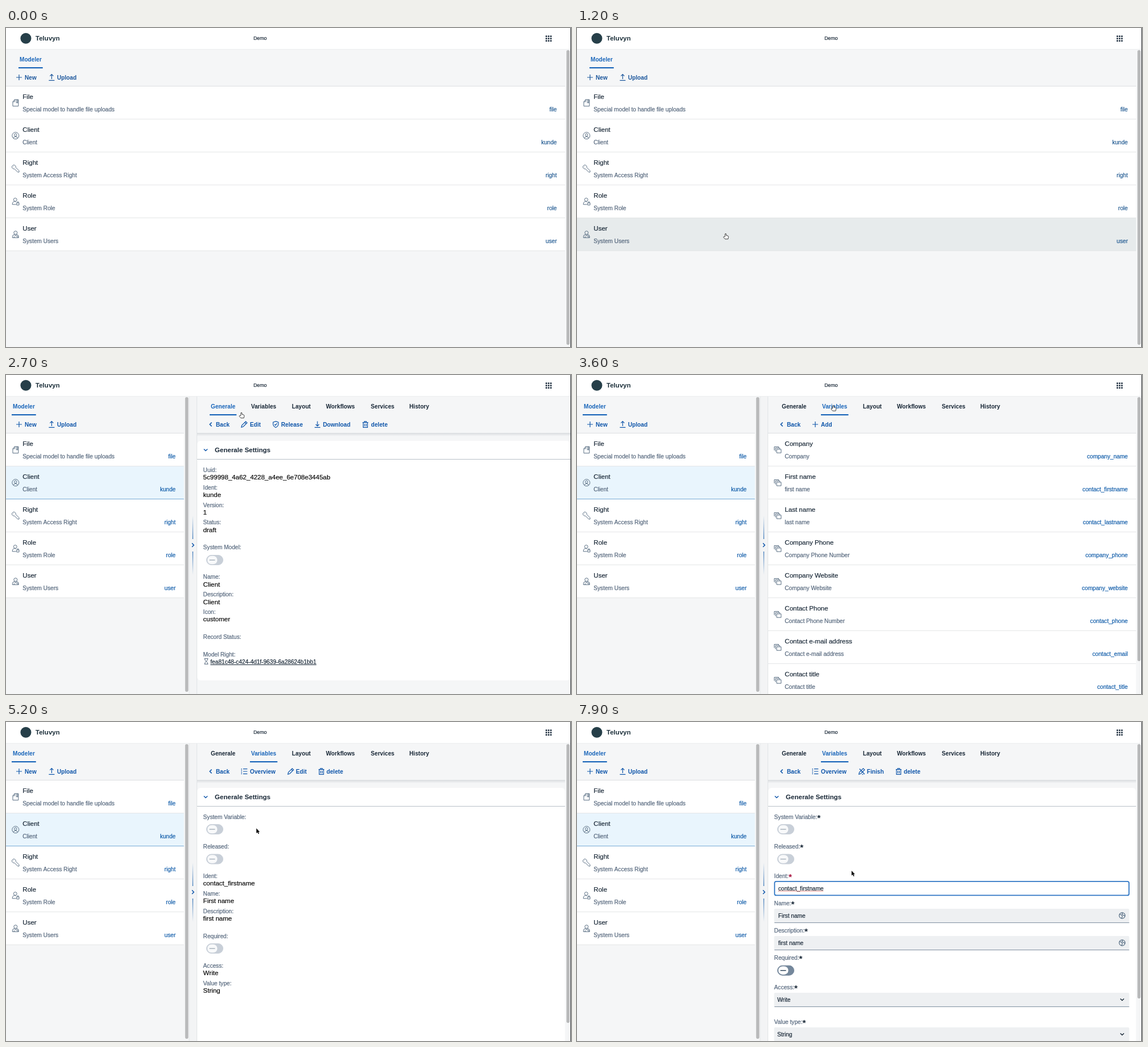
Animation, 996 px wide and 562 px high, one loop 8 s. Source, as an HTML page with a canvas:

```html
<!DOCTYPE html>
<html lang="en">
<head>
<meta charset="utf-8">
<title>Model editor</title>
<style>
html, body { margin: 0; width: 100%; height: 100%; overflow: hidden; background: #f5f6f7; }
canvas { display: block; width: 996px; height: 562px; }
</style>
</head>
<body>
<canvas id="stage"></canvas>
<script>
const W = 996, H = 562, LOOP = 8000, STEP = 100;
const SMALL = 10.14, LARGE = 11.55;
const INK = '#182736', GREY = '#52647a', PAGE = '#f5f6f7', HOVER = '#e7ebec', BLACK = '#080808';

const canvas = document.getElementById('stage');
const dpr = window.devicePixelRatio || 1;
canvas.width = W * dpr;
canvas.height = H * dpr;
const g = canvas.getContext('2d');
let accent, linkColor;

// Times of the hard changes between views
const SPLIT = 2100, LIST = 3200, READ = 4700, EDIT = 6400, FOCUS = 7400;

// Pointer path: time, x, y
const PATH = [
  [200, 560, 240], [500, 430, 380], [700, 330, 466], [1000, 310, 427],
  [1200, 262, 362], [1500, 140, 212], [1600, 128, 199], [2000, 132, 197],
  [2200, 200, 180], [2600, 405, 75], [2700, 415, 66], [3000, 450, 56],
  [3700, 452, 53], [3900, 440, 140], [4000, 433, 181], [4600, 440, 186],
  [5500, 442, 188], [6000, 505, 90], [6300, 508, 83], [6400, 508, 84],
  [6600, 501, 120], [7100, 488, 296], [7600, 487, 296], [7900, 484, 262]
];

const MODELS = [
  ['file', 'File', 'Special model to handle file uploads', 'file'],
  ['client', 'Client', 'Client', 'kunde'],
  ['key', 'Right', 'System Access Right', 'right'],
  ['role', 'Role', 'System Role', 'role'],
  ['user', 'User', 'System Users', 'user']
];
const VARIABLES = [
  ['Company', 'Company', 'company_name'],
  ['First name', 'first name', 'contact_firstname'],
  ['Last name', 'last name', 'contact_lastname'],
  ['Company Phone', 'Company Phone Number', 'company_phone'],
  ['Company Website', 'Company Website', 'company_website'],
  ['Contact Phone', 'Contact Phone Number', 'contact_phone'],
  ['Contact e-mail address', 'Contact e-mail address', 'contact_email'],
  ['Contact title', 'Contact title', 'contact_title']
].map(v => ['stack', ...v]);
const TABS = [['Generale', 361], ['Variables', 432], ['Layout', 504],
  ['Workflows', 564], ['Services', 643], ['History', 711]];

// Icons are drawn around 0,0
const ICONS = {
  file: 'M-4.8-1.8L-1.6-5.6H5V6H-4.8ZM-1.6-5.6V-1.8H-4.8M1.4-5.6V.4L2.6-.6 3.7.4V-5.6',
  client: 'M6 0A6 6 0 1 1-6 0A6 6 0 1 1 6 0M2.2-1.3A2.2 2.2 0 1 1-2.2-1.3A2.2 2.2 0 1 1 2.2-1.3M-3.6 4.6Q-3 1.6 0 1.6T3.6 4.6',
  key: 'M.4-2A3.4 3.4 0 1 0-2 .4L3.8 6.2H6.2V3.8ZM-3.7-3.7L-3-3',
  role: 'M2.4-3.2A2.9 2.9 0 1 1-3.4-3.2A2.9 2.9 0 1 1 2.4-3.2M1 5.2H-5.6Q-5.6.2-1.6-.1L1 .4M2 2.4H6.2V6.2H2ZM2.8 2.4V1Q4.1-.6 5.4 1V2.4',
  user: 'M3-3A3 3 0 1 1-3-3A3 3 0 1 1 3-3M-5.4 5.8V3.5Q-5 .4-2 .2L0 2.6 2 .2Q5 .4 5.4 3.5V5.8ZM.8 3.2H4.2V5.8M-2.5 3V5.8',
  stack: 'M-1.8-.8H6V5.5H-1.8ZM-3.9 3.2V-3H3.8V-1.4M-6 1V-5.2H1.7V-3.6',
  plus: 'M-5 0H5M0-5V5',
  upload: 'M-5 5.4H5M0 3V-5.4M-3-2.4L0-5.4 3-2.4',
  download: 'M-5 5.4H5M0-5.4V3M-3 0L0 3 3 0',
  back: 'M1.6-3.4L-1.8 0 1.6 3.4',
  edit: 'M-5 5L-4.2 1.6 2.6-5.2 5-2.8-1.8 4ZM.9-3.5L3.3-1.1',
  finish: 'M-5 5L-4.2 1.6 2.6-5.2 5-2.8-1.8 4ZM-4-4.5L5 5M.5 5.3H2.5',
  shield: 'M0-5.4L4.6-3.8V0Q4 3.7 0 5.5-4 3.7-4.6 0V-3.8ZM-2.1-.2L-.5 1.5 2.3-1.8',
  trash: 'M-5-3.4H5M-1.8-3.6V-5.2H1.8V-3.6M-3.8-3.2V5.3H3.8V-3.2M-1.4-1V3.2M1.4-1V3.2',
  overview: 'M-5.4-4.4H-4M-5.4 0H-4M-5.4 4.4H-4M-2-4.4H5.4M-2 0H5.4M-2 4.4H5.4M-5.4-2.2H-4M-5.4 2.2H-4',
  globe: 'M5.2 0A5.2 5.2 0 1 1-5.2 0A5.2 5.2 0 1 1 5.2 0M-4.4-2.2L-1-1 .4 1.4-1 4.8M.6-4.8L0-2.4 2.2-.4 4.6.6',
  hourglass: 'M-3.4-4.8H3.4M-3.4 4.8H3.4M-2.6-4.6Q-2.6-1.4 0 0T2.6 4.6M2.6-4.6Q2.6-1.4 0 0T-2.6 4.6',
  down: 'M-3.2-1.6L0 1.6 3.2-1.6',
  right: 'M-1.6-3.4L1.6 0-1.6 3.4'
};
for (const k in ICONS) ICONS[k] = new Path2D(ICONS[k]);

const ARROW = new Path2D('M0 0V8.6L2 6.8 3.5 10 4.9 9.3 3.5 6.3H6Z');
const HAND = new Path2D('M-1 5.4V.8Q0-.6 1 .8V3.4L4 4.1Q5.2 4.6 5 6.4L4.2 9.8H-1L-3.8 6.6Q-3.6 5-2.2 5.6Z');

function rect(x, y, w, h, color) {
  g.fillStyle = color;
  g.fillRect(x, y, w, h);
}
function round(x, y, w, h, r, fill, stroke, width = 1) {
  g.beginPath();
  g.roundRect(x, y, w, h, r);
  if (fill) { g.fillStyle = fill; g.fill(); }
  if (stroke) { g.strokeStyle = stroke; g.lineWidth = width; g.stroke(); }
}
function text(s, x, y, color, size = SMALL, bold = false, align = 'left') {
  const base = y + size * 0.355;   // y is the middle of the capitals
  g.font = `${bold ? 'bold ' : ''}${size}px "Liberation Sans", Arial, sans-serif`;
  g.textAlign = align;
  g.fillStyle = color;
  g.fillText(s, x, base);
  if (!bold) {
    // a hairline gives regular text a little more weight
    g.strokeStyle = color;
    g.lineWidth = 0.2;
    g.strokeText(s, x, base);
  }
  return g.measureText(s).width;
}
function icon(name, x, y, color, width = 1) {
  g.save();
  g.translate(x, y);
  g.strokeStyle = color;
  g.lineWidth = width;
  g.stroke(ICONS[name]);
  g.restore();
}
function button(name, label, x, labelX) {
  icon(name, x, 87, accent, name === 'back' ? 1.5 : 1.2);
  text(label, labelX, 87, accent, SMALL, true);
}
function tab(label, x, active) {
  const w = text(label, x, 55, active ? '#1a66ba' : INK, SMALL, true);
  if (active) rect(x - 2, 69, w + 4, 2.2, '#1a66ba');
}
function thumb(x, bottom) {
  round(x, 39, 5.6, bottom - 39, 2.8, '#b9babb');
}

function rows(items, x0, x1, hover, selected = -1) {
  items.forEach(([name, title, note, link], i) => {
    const y = 103 + 58 * i, active = i === selected;
    rect(x0, y, x1 - x0, 58, active ? '#e9f5fd' : i === hover ? HOVER : '#fff');
    rect(x0, y + 57, x1 - x0, active ? 1.5 : 1, active ? '#78aad6' : '#e4e6e7');
    icon(name, x0 + 16.8, y + 28.7, '#586d82');
    text(title, x0 + 29.3, y + 18, INK, LARGE);
    text(note, x0 + 29.3, y + 40, GREY);
    text(link, x1 - 14.5, y + 40, linkColor, SMALL, false, 'right');
  });
}
const rowAt = (p, x0, x1) =>
  p && p.x >= x0 && p.x < x1 && p.y >= 103 ? Math.floor((p.y - 103) / 58) : -1;

function topBar() {
  rect(0, 0, W, 37, '#fff');
  g.beginPath();
  g.arc(35, 18.3, 9.5, 0, 7);
  g.fillStyle = '#263f49';
  g.fill();
  text('Teluvyn', 52, 18, '#1c2f3a', LARGE, true);
  text('Demo', 436.2, 18, INK, 8.8);
  for (let i = 0; i < 9; i++)
    round(951.2 + i % 3 * 4, 13.2 + Math.floor(i / 3) * 4, 2.7, 2.7, 0.7, '#1d2d3e');
  rect(0, 37, W, 1, '#eceeef');
}

function modeler(split, p) {
  const edge = split ? 313.5 : 985.5;
  tab('Modeler', split ? 12 : 24, true);
  button('plus', 'New', 23, 33);
  button('upload', 'Upload', 80.5, 90);
  rect(0, 102, edge, 1, '#dcdfe1');
  rows(MODELS, 0, edge, rowAt(p, 0, edge), split ? 1 : -1);
  thumb(split ? 315.8 : 988, 558);
}

function splitter() {
  rect(322.5, 38, 14, 524, '#f3f4f5');
  rect(322.5, 38, 1, 524, '#e6e8ea');
  rect(336, 38, 1, 524, '#e1e4e6');
  for (const [top, bottom, from] of [[248, 289, 0], [311, 352, 1]]) {
    const fade = g.createLinearGradient(0, top, 0, bottom);
    fade.addColorStop(from, 'rgba(45,110,180,0)');
    fade.addColorStop(1 - from, 'rgba(45,110,180,1)');
    rect(328.7, top, 1.2, bottom - top, fade);
  }
  icon('right', 329.5, 299.7, accent, 1.5);
}

function toggle(y, enabled) {
  const color = enabled ? '#74879b' : '#c8cfd8';
  round(353.5, y - 8.5, 29, 17, 8.5, color, color);
  round(355, y - 7.3, 17.5, 14.6, 7.3, enabled ? '#fff' : '#f8f9fa');
  rect(358.5, y - 0.7, 10, 1.5, enabled ? '#33485d' : '#a8b2bd');
}
function field(label, y, value) {
  text(label + ':', 347.6, y, GREY);
  if (value) text(value, 347.6, y + 12.8, BLACK, LARGE);
}
function required(label, y, color = INK) {
  const w = text(label + ':', 347.6, y, GREY);
  text('*', 347.6 + w, y + 1.2, color, 15, true);
}
function input(y, value, kind) {
  const x = kind === 'select' ? 353 : 354.8;
  round(347.5, y - 12, 626, 24.5, 2, '#eef0f2');
  rect(348, y + 12, 625.5, 1.1, '#8796a5');
  text(value, x, y, INK);
  if (kind === 'select') icon('down', 961, y, INK, 1.4);
  if (kind === 'globe') icon('globe', 961, y, '#526a80', 1.2);
}
function panel(right, bottom) {
  const fade = g.createLinearGradient(0, 102, 0, 108);
  fade.addColorStop(0, '#d9dcdf');
  fade.addColorStop(1, PAGE);
  rect(337, 102, right - 337, 6, fade);
  round(337, 116, right - 337, bottom - 116, 6, '#fff');
  rect(337, 148, right - 337, 1, '#b9c0c7');
  icon('down', 352, 132, accent, 1.4);
  text('Generale Settings', 368, 132, INK, LARGE, true);
}

function general() {
  button('edit', 'Edit', 420, 430);
  button('shield', 'Release', 475.5, 485);
  button('download', 'Download', 549, 558.7);
  button('trash', 'delete', 633.5, 643.5);
  panel(995, 538);
  field('Uuid', 167, '5c99998_4a62_4228_a4ee_6e708e3445ab');
  field('Ident', 198, 'kunde');
  field('Version', 229, '1');
  field('Status', 259.7, 'draft');
  field('System Model', 303.7);
  toggle(326, false);
  field('Name', 355.8, 'Client');
  field('Description', 386.7, 'Client');
  field('Icon', 417.5, 'customer');
  field('Record Status', 461.5);
  field('Model Right', 492);
  icon('hourglass', 353, 504.5, GREY);
  const w = text('fea81c48-c424-4d1f-9639-6a28624b1bb1', 360.3, 505, INK);
  rect(360.3, 510, w, 1, INK);
}

function variableList(p) {
  button('plus', 'Add', 420, 430);
  rect(337, 102, 648.5, 1, '#dcdfe1');
  rows(VARIABLES, 337, 985.5, rowAt(p, 337, 985));
  thumb(988, 504);
}

function ripple() {
  g.beginPath();
  g.arc(509, 84, 10, 0, 7);
  g.fillStyle = 'rgba(130,135,140,.1)';
  g.fill();
  g.strokeStyle = 'rgba(130,135,140,.3)';
  g.lineWidth = 2;
  g.stroke();
}

function readVariable(t, p) {
  button('overview', 'Overview', 420, 430);
  if (p.x > 490 && p.y < 98) round(490, 76, 46, 22, 4, HOVER);
  if (t >= 6300) ripple();
  button('edit', 'Edit', 502, 511);
  button('trash', 'delete', 556, 565);
  panel(985.5, 570);
  field('System Variable', 167);
  toggle(189, false);
  field('Released', 219.5);
  toggle(241.5, false);
  field('Ident', 271.5, 'contact_firstname');
  field('Name', 302.5, 'First name');
  field('Description', 333.3, 'first name');
  field('Required', 377);
  toggle(399, false);
  field('Access', 429, 'Write');
  field('Value type', 460, 'String');
  thumb(988, 530);
}

function editVariable(focused) {
  button('overview', 'Overview', 420, 430);
  if (!focused) {
    round(490.5, 76.5, 55.5, 21.5, 4, '#fff', accent, 1.8);
    ripple();
  }
  button('finish', 'Finish', 502, 511);
  button('trash', 'delete', 567, 576);
  panel(985.5, 570);
  required('System Variable', 167);
  toggle(189, false);
  required('Released', 219.5);
  toggle(241.5, false);
  required('Ident', 271.5, focused ? '#a8123e' : INK);
  if (focused) {
    round(348.3, 280.8, 624.8, 24.6, 3, '#fff', '#2f76c4', 1.8);
    const w = text('contact_firstname', 354.8, 293, INK);
    for (let x = 0; x < w; x += 2) rect(354.8 + x, 297.4, 1.2, 1.2, '#e0655f');
  } else {
    input(293, 'contact_firstname');
  }
  required('Name', 319.5);
  input(341, 'First name', 'globe');
  required('Description', 367.5);
  input(389, 'first name', 'globe');
  required('Required', 415.5);
  toggle(437.7, true);
  required('Access', 467.5);
  input(489, 'Write', 'select');
  required('Value type', 528.5);
  input(550, 'String', 'select');
  thumb(988, 487);
}

function pointerAt(t) {
  if (t < PATH[0][0]) return null;
  const i = PATH.findIndex(k => k[0] > t);
  if (i < 0) return { x: PATH.at(-1)[1], y: PATH.at(-1)[2] };
  const [t0, x0, y0] = PATH[i - 1], [t1, x1, y1] = PATH[i];
  const k = (t - t0) / (t1 - t0);
  return { x: x0 + (x1 - x0) * k, y: y0 + (y1 - y0) * k };
}
function pointerKind(t, { x, y }) {
  if (t < SPLIT) return y > 103 && y < 392 ? 'hand' : 'arrow';
  if (x < 313 || y < 100) return 'hand';
  if (t >= LIST && t < READ) return 'hand';
  return t >= EDIT && y > 280 && y < 306 ? 'beam' : 'arrow';
}
function pointer(t, p) {
  const kind = pointerKind(t, p);
  g.save();
  g.translate(p.x, p.y);
  g.lineJoin = 'round';
  if (kind === 'beam') {
    rect(-0.5, -5, 1, 10, BLACK);
    rect(-2, -5.5, 4, 1, BLACK);
    rect(-2, 4.5, 4, 1, BLACK);
  } else if (kind === 'hand') {
    g.fillStyle = '#fff';
    g.fill(HAND);
    g.strokeStyle = '#2a2a2a';
    g.lineWidth = 0.9;
    g.stroke(HAND);
  } else {
    g.strokeStyle = '#fff';
    g.lineWidth = 1.4;
    g.stroke(ARROW);
    g.fillStyle = BLACK;
    g.fill(ARROW);
  }
  g.restore();
}

function draw(t) {
  const split = t >= SPLIT, p = pointerAt(t);
  accent = split ? '#0f56aa' : '#1b569c';
  linkColor = split ? '#0d5aa8' : '#1e5890';
  g.setTransform(dpr, 0, 0, dpr, 0, 0);
  rect(0, 0, W, H, PAGE);
  topBar();
  modeler(split, p);
  if (split) {
    splitter();
    const active = t < LIST ? 0 : 1;
    TABS.forEach(([label, x], i) => tab(label, x, i === active));
    button('back', 'Back', 361, 370);
    if (t < LIST) general();
    else if (t < READ) variableList(p);
    else if (t < EDIT) readVariable(t, p);
    else editVariable(t >= FOCUS);
  }
  rect(995, 0, 1, H, '#2e3134');
  if (p) pointer(t, p);
}

const start = performance.now();
function tick() {
  const t = (performance.now() - start) % LOOP;
  draw(Math.floor(t / STEP) * STEP);
  requestAnimationFrame(tick);
}
tick();
</script>
</body>
</html>
```
